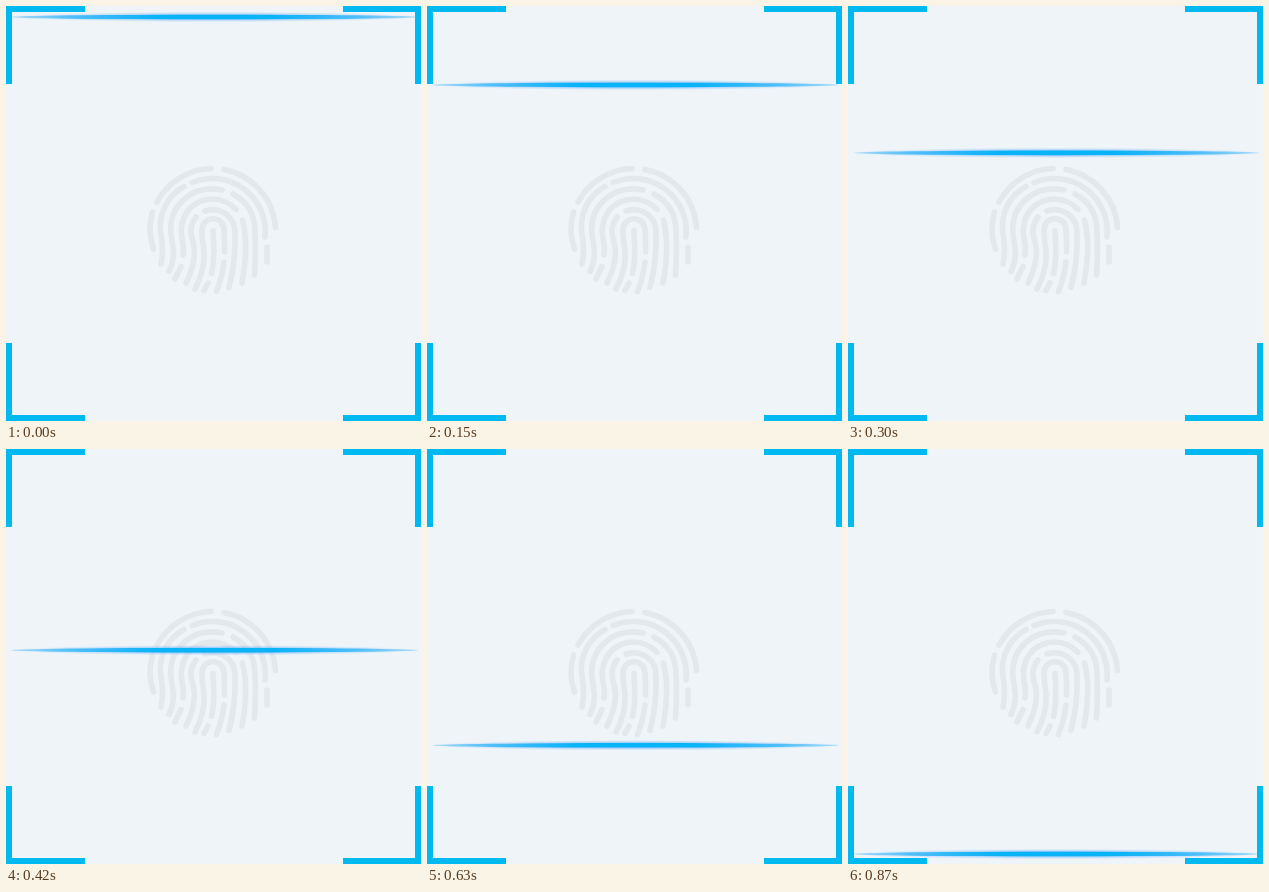
These frames come from a looping animation (415 px wide and 415 px high, 900 ms). An HTML page:

```html
<!DOCTYPE html>
<html lang="en">
<head>
<meta charset="utf-8">
<title>Fingerprint scan</title>
<style>
  html, body { margin: 0; width: 100%; height: 100%; overflow: hidden; background: #eef4f8; }
  svg { display: block; width: 100%; height: 100%; }
</style>
</head>
<body>
<svg viewBox="0 0 415 415">
  <defs>
    <linearGradient id="beam">
      <stop offset="0" stop-color="#38b6fb" stop-opacity=".35"/>
      <stop offset=".14" stop-color="#2bb5fa" stop-opacity=".75"/>
      <stop offset=".36" stop-color="#08b3f7"/>
      <stop offset=".64" stop-color="#08b3f7"/>
      <stop offset=".86" stop-color="#2bb5fa" stop-opacity=".75"/>
      <stop offset="1" stop-color="#38b6fb" stop-opacity=".35"/>
    </linearGradient>
    <radialGradient id="glow">
      <stop offset="0" stop-color="#4a9cfa" stop-opacity=".75"/>
      <stop offset=".5" stop-color="#58a6fa" stop-opacity=".5"/>
      <stop offset="1" stop-color="#70b4fa" stop-opacity="0"/>
    </radialGradient>
  </defs>
  <rect width="415" height="415" fill="#eef4f8"/>

  <g fill="none" stroke="#e4e8eb" stroke-width="5.6" stroke-linecap="round" stroke-linejoin="round">
    <!-- outer ring -->
    <path d="M151 196A64 64 0 0 1 205 162.500M218 163.500A63.500 63.500 0 0 1 269.500 221.500"/>
    <path d="M146.500 206Q141 225 147.500 243M261 241V256"/>
    <!-- second ring -->
    <path d="M186 176.500A53 53 0 0 1 259 231"/>
    <path d="M178 180.500C161 190 152 208 155 228Q158 244 155 258"/>
    <!-- third ring -->
    <path d="M216 184C187 178 162 199 165 228C167 243 170 250 163 265.500"/>
    <path d="M227 188C242 196 249 210 249 226Q250 249 248.500 269"/>
    <!-- fourth ring -->
    <path d="M177 249C179 238 174 232 175.500 221C178 203 191 193 207 193Q221 193.500 230 203.500"/>
    <path d="M236.500 214Q243 239 236 277M175 260.500L169 273"/>
    <!-- fifth ring -->
    <path d="M199 205C215 200 229 211 229 226Q230 255 223 281.500"/>
    <path d="M190 211C180 225 188 233 188.500 245C188.500 256 185 267 180 277"/>
    <!-- core -->
    <path d="M189 283C196 270 199 259 198 245C197 237 196 231 196 224C196 209 218 209 218 224Q219 235 218.500 246"/>
    <path d="M207 224.500C207 235 210 248 205.500 267.500M218 256Q216 272 210.500 285.500M202 277L198 284.500"/>
  </g>

  <g fill="none" stroke="#00b9f1" stroke-width="6">
    <path d="M79 3H3V78M337 3H412V78M3 337V412H79M412 337V412H337"/>
  </g>

  <g id="scan">
    <ellipse cx="208.500" rx="204" ry="5.200" fill="url(#glow)"/>
    <ellipse cx="208.500" rx="203.500" ry="2.300" fill="url(#beam)"/>
  </g>
</svg>
<script>
  const LOOP = 900, STEP = 30, TOP = 11, BOTTOM = 405;
  const scan = document.getElementById('scan');
  const start = performance.now();

  function draw(ms) {
    const step = Math.floor((ms % LOOP) / STEP);
    const y = TOP + (BOTTOM - TOP) * step / (LOOP / STEP - 1);
    scan.setAttribute('transform', `translate(0 ${y.toFixed(2)})`);
  }

  function tick() {
    draw(performance.now() - start);
    requestAnimationFrame(tick);
  }
  tick();
</script>
</body>
</html>
```
